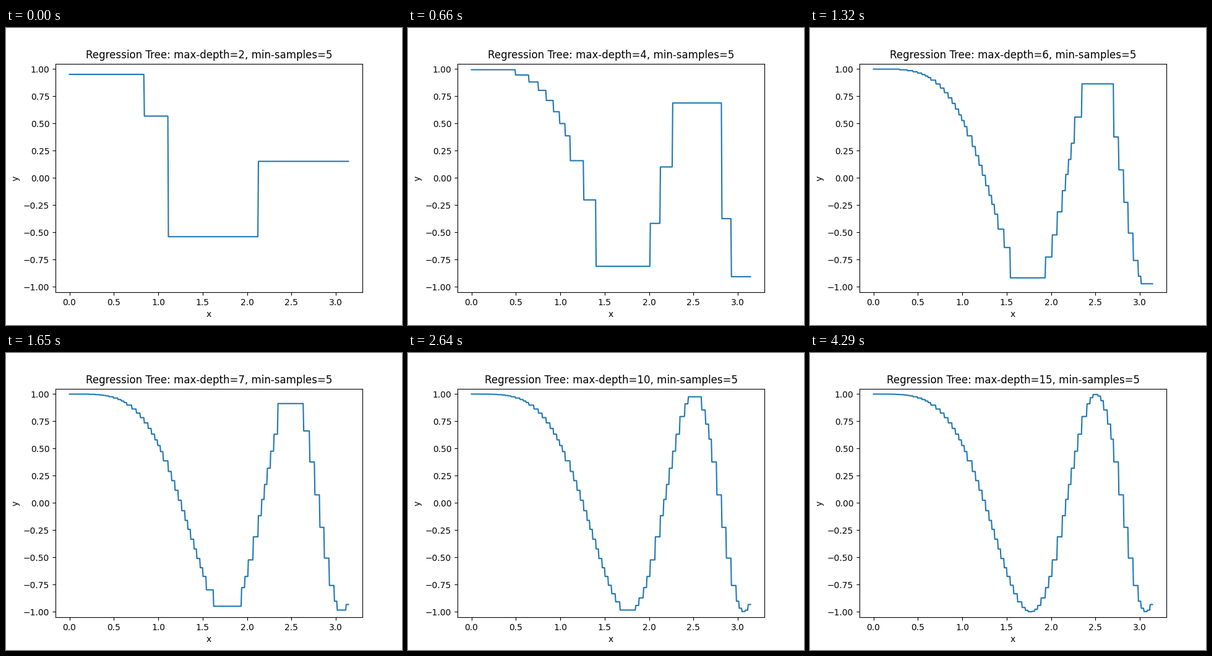
Animation, 640 px wide and 480 px high, one loop 4.62 s. Source, as a matplotlib script:

```python
import numpy as np
import matplotlib.pyplot as plt
from matplotlib.animation import FuncAnimation

SAMPLES = 500
MIN_SAMPLES = 5
DEPTHS = range(2, 16)

plt.rcParams["font.family"] = "DejaVu Sans"


def best_split(values):
    """Size of the left part that minimises the squared error of both parts."""
    centered = values - values.mean()
    n = len(values)
    left_size = np.arange(MIN_SAMPLES, n - MIN_SAMPLES + 1)
    left_sum = np.cumsum(centered)[left_size - 1]
    # The centered sums of both parts are equal and opposite.
    gain = left_sum**2 / left_size + left_sum**2 / (n - left_size)
    return left_size[np.argmax(gain)]


def predict(values, depth):
    """Fit a regression tree to ordered samples and return its output."""
    if depth == 0 or len(values) < 2 * MIN_SAMPLES:
        return np.full(len(values), values.mean())
    k = best_split(values)
    return np.concatenate([predict(values[:k], depth - 1),
                           predict(values[k:], depth - 1)])


x = np.linspace(0, np.pi, SAMPLES)
y = np.cos(x**2)
predictions = [predict(y, depth) for depth in DEPTHS]

fig, ax = plt.subplots(figsize=(6.4, 4.8), dpi=100)
line, = ax.plot(x, predictions[0])
ax.set_ylim(-1.05, 1.05)
ax.set_xlabel("x")
ax.set_ylabel("y")
title = ax.set_title("")


def update(i):
    line.set_ydata(predictions[i])
    title.set_text(f"Regression Tree: max-depth={DEPTHS[i]}, "
                   f"min-samples={MIN_SAMPLES}")
    return line, title


animation = FuncAnimation(fig, update, frames=len(DEPTHS), interval=330,
                          repeat=True, repeat_delay=0, blit=False)
plt.show()
```
